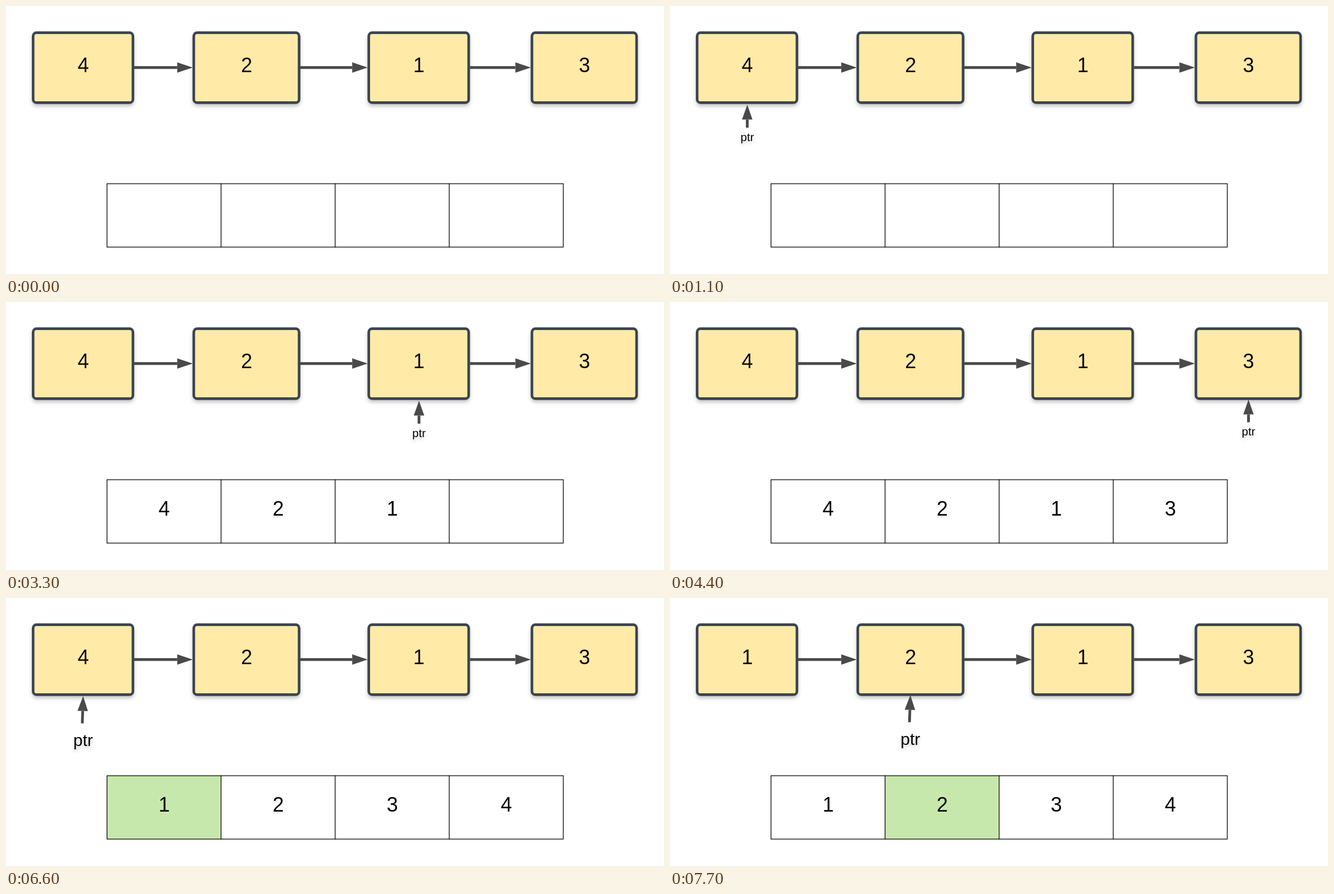
An HTML page for the animation above (8 s loop, 1171 px wide and 478 px high).

```html
<!DOCTYPE html>
<html lang="en">
<head>
<meta charset="utf-8">
<title>Linked list to sorted array</title>
<style>
  html, body { margin: 0; width: 100%; height: 100%; overflow: hidden; background: #fff; }
  svg { display: block; width: 100vw; height: 100vh; }
  text { font-family: "Liberation Sans", Arial, sans-serif; text-anchor: middle; fill: #060606; }
  .node { fill: #ffeaa8; stroke: #3b444e; stroke-width: 4.6; filter: drop-shadow(0 4px 3px rgba(0, 0, 0, .24)); }
  .line { fill: none; stroke: #4a4a4a; }
  .head { fill: #4a4a4a; }
  .cell { stroke: #111; stroke-width: 1.35; }
  .ptr { filter: drop-shadow(0 4px 3px rgba(0, 0, 0, .2)); }
  .note { fill: #e4e4e4; filter: drop-shadow(0 3px 3px rgba(0, 0, 0, .24)); }
</style>
</head>
<body>
<svg id="stage" viewBox="0 0 1171 478" preserveAspectRatio="none"></svg>
<script>
const STEP = 1100, LOOP = 8000;
const stage = document.getElementById('stage');

// left edge and width of each list node
const nodes = [[48.3, 177.6], [334.2, 187.4], [645.6, 177.8], [936, 186.2]];

// p: pointer as [tip x, tip y, tail x, tail y, label size, label baseline]
const steps = [
  { list: '4213', cells: '' },
  { list: '4213', cells: '', p: [137.5, 176, 137.5, 217, 20.5, 240.5] },
  { list: '4213', cells: '42', p: [427.7, 176, 427.7, 217, 20.5, 240.5] },
  { list: '4213', cells: '421', p: [735, 176, 735, 217, 20.5, 240.5] },
  { list: '4213', cells: '4213', p: [1029.5, 174, 1029.5, 214.5, 20.5, 238.3] },
  { list: '4213', cells: '4213', sort: true },
  { list: '4213', cells: '1234', mark: 0, p: [137.3, 175, 135.8, 223.7, 30, 263.5] },
  { list: '1213', cells: '1234', mark: 1, p: [427.8, 173, 426.2, 221.5, 30, 261.5] }
];

const label = (str, x, y, size = 36, cls = '') =>
  `<text class="${cls}" x="${x}" y="${y}" font-size="${size}">${str}</text>`;

function head(bx, by, tx, ty, half) {
  const len = Math.hypot(tx - bx, ty - by);
  const nx = -(ty - by) / len * half, ny = (tx - bx) / len * half;
  return `<path class="head" d="M${tx} ${ty}L${bx + nx} ${by + ny}L${bx - nx} ${by - ny}Z"/>`;
}

function arrow(x1, y1, x2, y2, size = 27.5) {
  const len = Math.hypot(x2 - x1, y2 - y1);
  const bx = x2 - (x2 - x1) / len * size, by = y2 - (y2 - y1) / len * size;
  return `<path class="line" stroke-width="4.9" d="M${x1} ${y1}L${bx} ${by}"/>` + head(bx, by, x2, y2, 9.3);
}

function drawList(values) {
  return nodes.map(([x, w], i) => {
    const next = nodes[i + 1];
    return `<rect class="node" x="${x}" y="47.6" width="${w}" height="124.8" rx="6"/>` +
      label(values[i], x + w / 2 + .3, 118.3) +
      (next ? arrow(x + w + 2, 109.7, next[0] - 2, 109.7) : '');
  }).join('');
}

function drawCells(values, mark) {
  let out = '';
  for (let i = 0; i < 4; i++) {
    const x = 179.7 + i * 203;
    const fill = i === mark ? '#c7e8ac' : '#fff';
    out += `<rect class="cell" x="${x}" y="317" width="203" height="113" fill="${fill}"/>`;
    if (values[i]) out += label(values[i], x + 101.8, 381.3);
  }
  return out;
}

function drawPointer([x, y, tailX, tailY, size, base]) {
  return arrow(tailX, tailY, x, y, 26.5) + label('ptr', x, base, size, 'ptr');
}

function drawSort() {
  const curve = d => `<path class="line" stroke-width="4" d="${d}"/>`;
  return '<rect class="note" x="90" y="176" width="235" height="60" rx="6"/>' +
    label('Sort the array', 207.8, 211, 29.4) +
    curve('M393 259C475 172 785 178 866 244') + head(864.5, 242.5, 880, 258, 7.5) +
    curve('M727 351C732 468 435 458 392 374') + head(391.5, 373.5, 387, 352, 7.5) +
    curve('M890 351C900 382 880 408 825 408C785 408 759 393 753 374') + head(753, 374, 750, 352, 7.5);
}

function draw(s) {
  const base = drawList(s.list) + drawCells(s.cells, s.mark);
  if (!s.sort) return base + (s.p ? drawPointer(s.p) : '');
  return `<g transform="translate(163 0) scale(.8177)">${base}</g>` + drawSort() +
    '<path d="M0 0H51V478H0ZM1120 0H1171V478H1120Z"/>';
}

let shown = -1;
const start = performance.now();

function tick() {
  const i = Math.floor((performance.now() - start) % LOOP / STEP);
  if (i !== shown) {
    shown = i;
    stage.innerHTML = draw(steps[i]);
  }
  requestAnimationFrame(tick);
}
tick();
</script>
</body>
</html>
```
